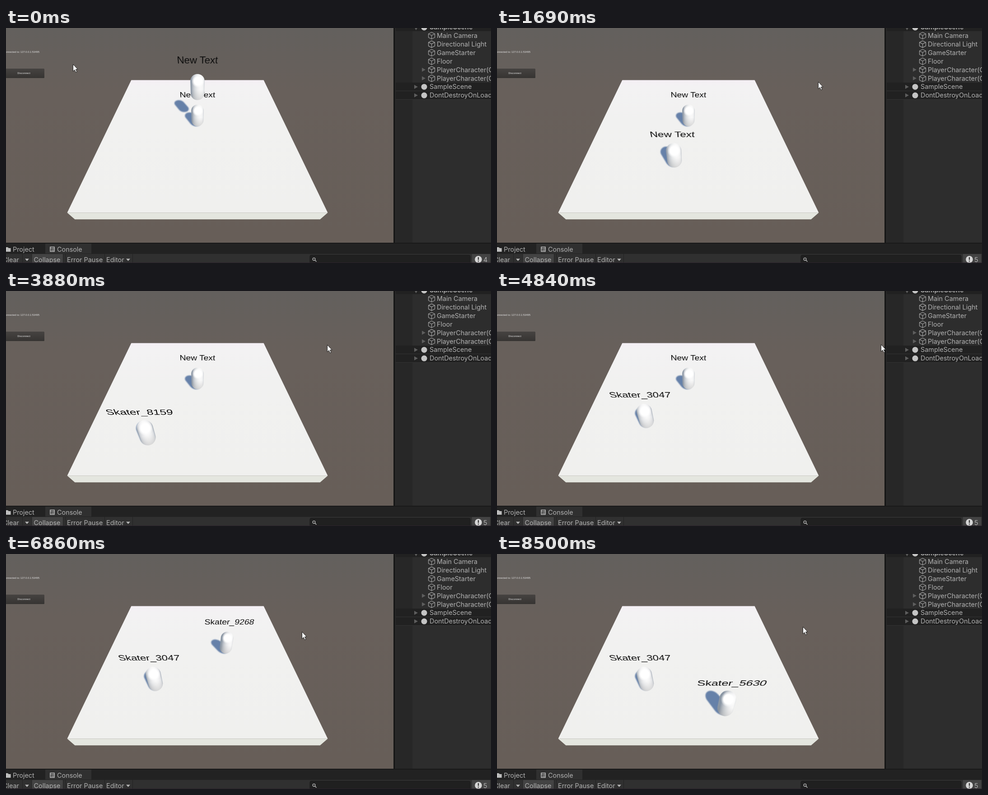
Animation of 1074 by 521 pixels, one loop 8.58 s. Source, as an HTML page:

```html
<!DOCTYPE html>
<html lang="en">
<head>
<meta charset="utf-8">
<title>Networked players</title>
<style>
html, body { margin: 0; width: 100%; height: 100%; overflow: hidden; background: #191919; }
#stage { position: absolute; left: 0; top: 0; width: 1074px; height: 521px; overflow: hidden; }
svg { position: absolute; left: 0; top: 0; }
.label {
  position: absolute; left: 0; top: 0; transform-origin: 0 0; white-space: pre;
  font: 24px/24px "Liberation Sans", Arial, sans-serif; color: #0c0c0c;
}
#ui { z-index: 9; font: 14.4px Inter, sans-serif; fill: #b2b2b2; }
.tiny { font: 5.8px "Liberation Sans", Arial, sans-serif; fill: #e6e6e6; }
</style>
</head>
<body>
<div id="stage">
  <svg width="1074" height="521">
    <defs>
      <linearGradient id="sky" x2="0" y2="1">
        <stop stop-color="#63605d"/><stop offset=".3" stop-color="#68605b"/><stop offset="1" stop-color="#675e58"/>
      </linearGradient>
      <linearGradient id="top" x2="0" y2="1">
        <stop stop-color="#f4eff4"/><stop offset=".05" stop-color="#f3f2f3"/><stop offset=".3" stop-color="#f1f1f0"/><stop offset="1" stop-color="#f0f0ee"/>
      </linearGradient>
      <linearGradient id="shade" x2="0" y2="1">
        <stop offset=".6" stop-color="#777" stop-opacity="0"/><stop offset="1" stop-color="#777" stop-opacity=".25"/>
      </linearGradient>
      <radialGradient id="shine">
        <stop offset=".6" stop-color="#fff"/><stop offset="1" stop-color="#fff" stop-opacity="0"/>
      </radialGradient>
      <filter id="soft"><feGaussianBlur stdDeviation=".8"/></filter>
    </defs>
    <rect width="858" height="476" fill="url(#sky)"/>
    <path d="M135.500 409.400H712.500L695.500 424.300H152.500Z" fill="#e4e6df"/>
    <path d="M277.400 115.400H570.600L712.500 409.400H135.500Z" fill="url(#top)"/>
    <path id="shadows" fill="#6681a9" filter="url(#soft)"/>
  </svg>
  <svg id="ui" width="1074" height="521">
    <defs>
      <linearGradient id="btn" x2="0" y2="1"><stop stop-color="#464341"/><stop offset="1" stop-color="#363432"/></linearGradient>
      <path id="cube" d="M0-7.5 7-4V4L0 7.5-7 4V-4ZM-7-4 0-.5 7-4M0-.5V7.5" fill="none" stroke="#a0a0a0" stroke-width="1.2" stroke-linejoin="round"/>
      <path id="arrow" d="M-4-4.5 4 0-4 4.5Z" fill="#5e5e5e"/>
      <path id="drop" d="M-4.5-2.5H4.5L0 2.5Z" fill="#b8b8b8"/>
    </defs>
    <text class="tiny" x="74" y="55" text-anchor="end">Connected to: 127.0.0.1:53495</text>
    <rect x="-4" y="90" width="89" height="21" rx="1.5" fill="url(#btn)"/>
    <text class="tiny" x="39.5" y="102" text-anchor="middle">Disconnect</text>

    <rect x="858" width="5" height="478" fill="#191919"/>
    <rect x="862" width="1" height="476" fill="#303030"/>
    <rect x="863" width="211" height="476" fill="#2d2d2d"/>
    <rect x="863" width="37" height="476" fill="#272727"/>
    <rect x="863" width="211" height="7" fill="#212121"/>
    <rect x="863" y="121" width="211" height="37" fill="#212121"/>
    <path d="M863 139.5H1074M863 158.5H1074" stroke="#343434"/>
    <g id="tree"></g>

    <rect y="476" width="1074" height="45" fill="#191919"/>
    <rect y="478" width="1074" height="22" fill="#222"/>
    <rect x="87" y="478" width="102" height="22" fill="#303030"/>
    <rect y="500" width="1074" height="21" fill="#303030"/>
    <path d="M0 500.5H1074" stroke="#242424"/>
    <rect x="57" y="501" width="69" height="20" fill="#434343"/>
    <path d="M36.5 501V521M57 501V521M126.5 501V521M131.500 501V521M218.5 501V521M280.5 501V521" stroke="#222"/>
    <path d="M-2 486H4L6 488H10.5V496H-2Z" fill="#bdbdbd"/>
    <path d="M98 485.5H107V495.5H98Z" fill="none" stroke="#bdbdbd" stroke-width="1.6"/>
    <path d="M97 488.5H108M100 491H106M100 493.5H106" stroke="#bdbdbd"/>
    <text x="15" y="495.5">Project</text>
    <text x="113" y="495.5">Console</text>
    <text x="-7" y="519">Clear</text>
    <use href="#drop" x="46.5" y="514"/>
    <text x="61.5" y="519">Collapse</text>
    <text x="135" y="519">Error Pause</text>
    <text x="222" y="519">Editor</text>
    <use href="#drop" x="270.5" y="514"/>
    <rect x="673" y="503.5" width="355" height="20" rx="3" fill="#202020" stroke="#191919"/>
    <circle cx="682" cy="512.5" r="2.8" fill="none" stroke="#bbb" stroke-width="1.3"/>
    <path d="M684 514.5 687.5 518" stroke="#bbb" stroke-width="1.5"/>
    <rect x="1032" y="501" width="40" height="20" fill="#434343"/>
    <circle cx="1046" cy="513" r="7.8" fill="#d6d6d6"/>
    <path d="M1046 508V514M1046 515.8V518" stroke="#333" stroke-width="2.2"/>
    <text id="count" x="1057" y="519"></text>
    <path d="M0 520.5H1074" stroke="#2c222c"/>
    <path id="cursor" d="M.5.5V16L4 12.7 6.6 18.3 9 17.2 6.5 11.7H11Z" fill="#fff" stroke="#111" stroke-width=".9"/>
  </svg>
</div>
<script>
const LOOP = 8580;
const CX = 424, CY = 232.6, FOCAL = 421.6, FX = FOCAL * Math.SQRT2;  // camera pitched 45 degrees
const EYE = 11, EM = 0.645 / 24, LAND = 557;
const SUN = [.5, -.866], AMBIENT = [.26, .31, .38], SUNLIGHT = [1.06, .98, .87];
const BANDS = 12;
const $ = id => document.getElementById(id);

// Keys are [time, x, depth]
const walks = [
  [[880, 0, 12], [1440, -2.1, 7.87], [1690, -.96, 7.865], [2230, 1.66, 8], [2700, 1.75, 8.15], [3070, 1.04, 9.34],
   [3130, .8, 9.2], [3560, -1.48, 7.75], [3880, -3.17, 6.73], [3960, -3.35, 6.75], [4460, -2.89, 8.075]],
  [[5060, 0, 12], [5320, .06, 10.58], [5720, 2.24, 8.717], [5800, 2.28, 8.45], [6210, .15, 9.5], [6550, 2.66, 9.5],
   [6860, 2.35, 11.845], [6930, 2.34, 11.8], [8000, 2.29, 6.5], [8240, 2.29, 6.184]]
];
const names = [
  [[0, 'New Text'], [1770, 'Skater_6304'], [3400, 'Skater_8159'], [4460, 'Skater_3047']],
  [[0, 'New Text'], [5200, 'Skater_7460'], [6400, 'Skater_9268'], [7150, 'Skater_5630']]
];
const pointer = [[60, 148, 80], [300, 260, 54], [600, 470, 60], [890, 680, 104], [1050, 711, 119],
  [4540, 711, 119], [4720, 850, 114], [4950, 850, 122], [5200, 655, 172], [8499, 655, 172], [8500, 677, 161]];

function along(keys, t) {
  const i = keys.findIndex(k => k[0] > t);
  if (i < 0) return keys[keys.length - 1].slice(1);
  if (!i) return keys[0].slice(1);
  const a = keys[i - 1], b = keys[i], u = (t - a[0]) / (b[0] - a[0]);
  return [a[1] + (b[1] - a[1]) * u, a[2] + (b[2] - a[2]) * u];
}
const latest = (list, t) => list.filter(e => e[0] <= t).pop()[1];

function project(x, y, z) {
  const d = z + EYE - y;
  return [CX + FX * x / d, CY + FOCAL * (EYE - y - z) / d, FX / d];
}

// Ground shadow for a sun at 50 degrees elevation, -30 degrees heading
function shadowPath(x, y, z) {
  let d = '';
  for (let i = 0; i < 40; i++) {
    const a = i * Math.PI / 20, c = Math.cos(a);
    const far = .839 * (y + (c > 0 ? .5 : -.5)) + .6 * c, side = .46 * Math.sin(a);
    const p = project(x - .5 * far + .866 * side, 0, z + .866 * far + .5 * side);
    d += (i ? 'L' : 'M') + p[0].toFixed(2) + ' ' + p[1].toFixed(2);
  }
  return d + 'Z';
}

// Diffuse colour of the upright wall at u = -1 (left edge) to 1 (right edge)
function wallColour(x, z, u) {
  const n = Math.hypot(x, z), c = Math.sqrt(1 - u * u);
  const nx = (z * u - x * c) / n, nz = (-x * u - z * c) / n;
  const lit = .643 * Math.max(0, nx * SUN[0] + nz * SUN[1]);
  const rgb = AMBIENT.map((a, i) => Math.round(255 * Math.min(1, a + SUNLIGHT[i] * lit) ** (1 / 2.2)));
  return `rgb(${rgb})`;
}

function makePlayer(id) {
  const box = document.createElement('div');
  let stops = '';
  for (let i = 0; i <= BANDS; i++) stops += `<stop offset="${i / BANDS}"/>`;
  box.innerHTML = `<svg width="1074" height="521"><linearGradient id="${id}">${stops}</linearGradient>
    <g><path fill="url(#${id})"/><path fill="url(#shade)"/><circle fill="url(#shine)"/></g></svg><div class="label"></div>`;
  box.style.cssText = 'position:absolute;left:0;top:0;width:1074px;height:521px';
  $('stage').insertBefore(box, $('ui'));
  return { box, group: box.querySelector('g'), paths: box.querySelectorAll('path'), stops: box.querySelectorAll('stop'),
    shine: box.querySelector('circle'), label: box.querySelector('.label') };
}

function drawPlayer(p, x, y, z, name, order) {
  const [tx, ty, ts] = project(x, y + .5, z), [bx, by, bs] = project(x, y - .5, z);
  const r = ts / 2, q = bs / 2, len = Math.hypot(bx - tx, by - ty);
  const turn = -Math.atan2(bx - tx, by - ty) * 180 / Math.PI;
  p.group.setAttribute('transform', `translate(${tx} ${ty}) rotate(${turn})`);
  for (const path of p.paths)
    path.setAttribute('d', `M${-r} 0A${r} ${r} 0 0 1 ${r} 0L${q} ${len}A${q} ${q} 0 0 1 ${-q} ${len}Z`);
  p.stops.forEach((s, i) => s.setAttribute('stop-color', wallColour(x, z, 2 * i / BANDS - 1)));
  p.shine.setAttribute('r', r * .9);
  p.shine.setAttribute('cx', r * .08);

  // Upright text plane two units above the body
  const d = z + EYE - y - 2, e = EYE - y - 2 - z, k = EM / d;
  const m = [FX * k, 0, 0, 0, CX * k, (CY + FOCAL) * k, 0, k, 0, 0, 1, 0, CX + FX * x / d, CY + FOCAL * e / d, 0, 1];
  p.label.style.transform = `matrix3d(${m.map(v => v.toFixed(7))}) translate(-50%, -50%)`;
  if (p.label.textContent !== name) p.label.textContent = name;
  p.box.style.zIndex = order;
}

function buildTree() {
  let out = '<use href="#arrow" transform="translate(908 1) rotate(90)"/><circle cx="926" cy="-1" r="6.5" fill="#c4c4c4"/>' +
    '<text x="938" y="3" font-weight="600">SampleScene</text>';
  ['Main Camera', 'Directional Light', 'GameStarter', 'Floor', 'PlayerCharacter(Clone)', 'PlayerCharacter(Clone)',
    'SampleScene', 'DontDestroyOnLoad'].forEach((name, i) => {
    const y = 17 + i * 18.9, scene = i > 5;
    if (i > 3) out += `<use href="#arrow" x="${scene ? 908 : 925}" y="${y}"/>`;
    out += scene ? `<circle cx="926" cy="${y}" r="6.5" fill="#c4c4c4"/>` : `<use href="#cube" x="942.5" y="${y}"/>`;
    out += `<text x="${scene ? 938 : 954}" y="${y + 5}">${name}</text>`;
  });
  $('tree').innerHTML = out;
}

buildTree();
const second = makePlayer('wallB'), first = makePlayer('wallA');

function draw(t) {
  const [ax, az] = along(walks[0], t), [bx, bz] = along(walks[1], t), s = t / 1000;
  const ay = t < LAND ? 3.64 - 2 * s - 4.9 * s * s : 1;
  drawPlayer(first, ax, ay, az, latest(names[0], t), az <= bz ? 2 : 1);
  drawPlayer(second, bx, 1, bz, latest(names[1], t), az <= bz ? 1 : 2);
  $('shadows').setAttribute('d', shadowPath(ax, ay, az) + shadowPath(bx, 1, bz));
  $('cursor').setAttribute('transform', `translate(${along(pointer, t)})`);
  $('count').textContent = t < 450 ? 4 : 5;
}

function tick() {
  draw(performance.now() % LOOP);
  requestAnimationFrame(tick);
}
tick();
</script>
</body>
</html>
```
